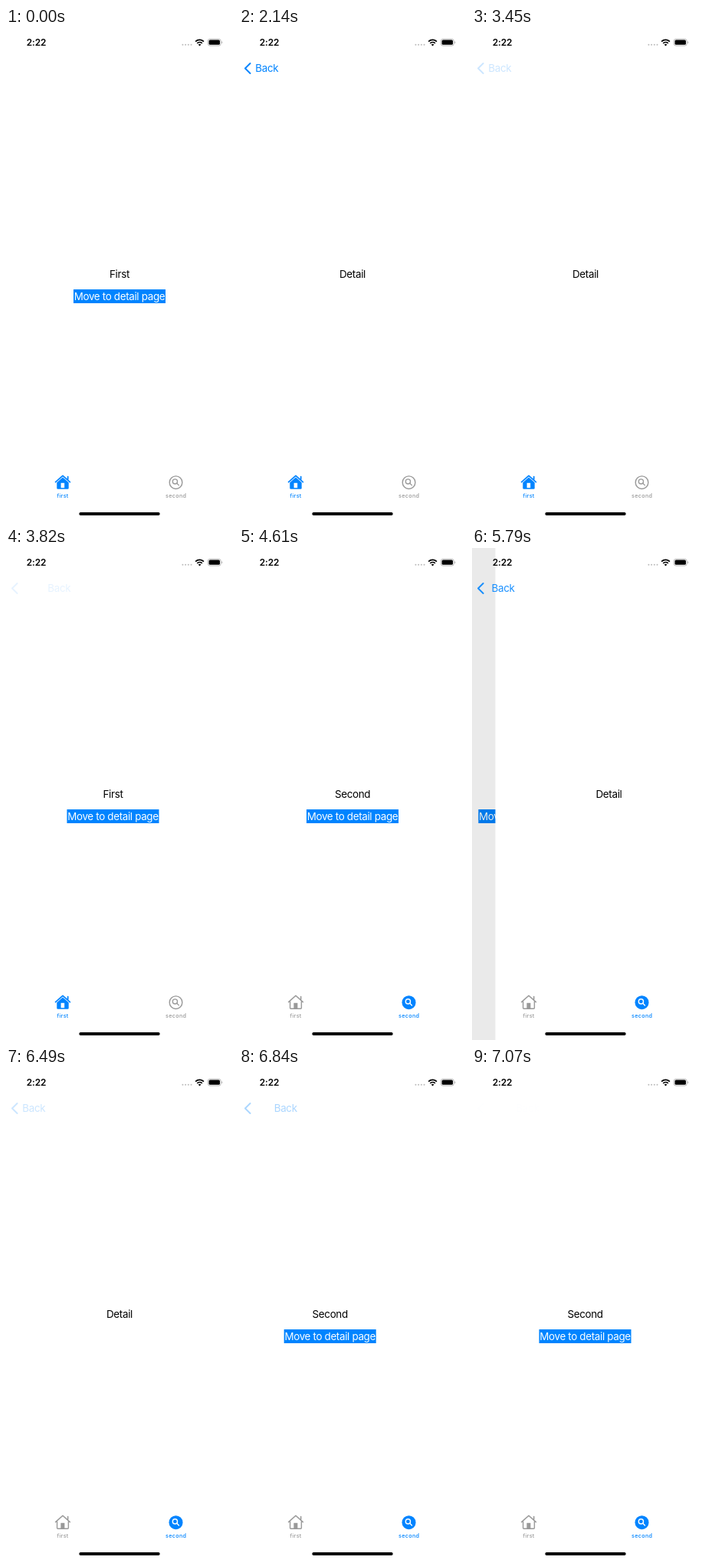
An HTML page for the animation above (7170 ms loop, 296x640 px).

```html
<!DOCTYPE html>
<html lang="en">
<head>
<meta charset="utf-8">
<title>Tab navigation</title>
<style>
  html, body { margin: 0; width: 100%; height: 100%; overflow: hidden; background: #fff; }

  /* --cover: how far the detail page covers the list page, 0 to 1 */
  svg {
    --cover: 0; --press: 1; --dim: 0; --slide: 41px; --second: 0;
    --blue: #0084ff; --gray: #999;
    display: block;
    font: 13.42px Inter, "Liberation Sans", sans-serif;
    letter-spacing: -.34px;
    animation: tour 7170ms step-end infinite;
  }
  @keyframes tour {
    0%      { --cover: 0; --press: 1; --dim: 0; --slide: 41px; --second: 0; }
    29.847% { --cover: 1; }
    48.117% { --press: .2; --slide: 36.5px; }
    51.883% { --cover: .33; --press: 1; }
    53.278% { --cover: .096; }
    54.951% { --cover: .022; }
    56.485% { --cover: .0056; }
    62.064% { --cover: 0; }
    64.296% { --second: 1; --slide: 41px; }
    77.545% { --cover: .55; --dim: .09; }
    79.219% { --cover: .897; }
    80.893% { --cover: .976; }
    82.427% { --cover: .994; }
    90.516% { --cover: 1; --press: .2; --dim: 0; --slide: 36.5px; }
    94.003% { --cover: .33; --press: 1; }
    95.537% { --cover: .09; }
    97.071% { --cover: .022; }
    98.605% { --cover: .0056; }
  }

  .list   { transform: translateX(calc(var(--cover) * -88.8px)); }
  .detail { transform: translateX(calc((1 - var(--cover)) * 296px)); }
  .shade  { opacity: calc(var(--cover) * var(--dim)); }
  .back   { opacity: calc(var(--cover) * var(--press)); fill: var(--blue); }
  .label  { transform: translateX(calc((1 - var(--cover)) * var(--slide))); }
  .on1    { opacity: calc(1 - var(--second)); }
  .on2    { opacity: var(--second); }

  .mid  { text-anchor: middle; }
  .time { font-size: 11.9px; font-weight: 600; letter-spacing: -.1px; }
  .tabs { font-size: 7.2px; font-weight: 500; letter-spacing: .3px; text-anchor: middle; }
  .line { fill: none; stroke-linecap: round; stroke-linejoin: round; }
  .blue { fill: var(--blue); }
  .gray { fill: var(--gray); }
  .blue .line { stroke: var(--blue); }
  .gray .line { stroke: var(--gray); }
</style>
</head>
<body>
<svg width="296" height="640" viewBox="0 0 296 640">
  <defs>
    <path id="roof" d="M64.6 590.6 74 582.3 83.4 590.6M80.7 587.6V583.6"/>
    <g id="lens">
      <circle cx="220.4" cy="589.9" r="3.1"/>
      <path d="M222.8 592.3 225.4 594.9"/>
    </g>
  </defs>

  <rect width="296" height="640" fill="#fff"/>

  <g class="list mid">
    <text class="on1" x="148" y="325.2">First</text>
    <text class="on2" x="148" y="325.2">Second</text>
    <rect class="blue" x="88" y="340" width="120" height="18"/>
    <text x="148" y="354.2" fill="#fff">Move to detail page</text>
  </g>
  <rect class="shade" width="296" height="640"/>

  <g class="detail mid">
    <rect width="296" height="640" fill="#fff"/>
    <text x="148" y="325.2">Detail</text>
  </g>

  <g class="back">
    <path class="line" d="M14.6 46 8 52.5 14.6 59" stroke="var(--blue)" stroke-width="1.9"/>
    <text class="label" x="21.3" y="57.2">Back</text>
  </g>

  <g class="status">
    <text class="time mid" x="39.5" y="23.2">2:22</text>
    <path class="line" d="M230.4 21.8h11.2" stroke="#bbb" stroke-width="2" stroke-dasharray="0 3.7"/>
    <g fill="none" stroke="#000" stroke-width="1.7">
      <path d="M247.1 17.6a7.8 7.8 0 0 1 10.8 0"/>
      <path d="M249.2 19.9a4.8 4.8 0 0 1 6.6 0"/>
    </g>
    <path d="M252.5 23.4 250.7 21.6a2.6 2.6 0 0 1 3.6 0z"/>
    <rect x="263.2" y="14.3" width="17" height="8.8" rx="2.7" fill="none" stroke="#aaa" stroke-width=".8"/>
    <rect x="264.5" y="15.6" width="14.4" height="6.2" rx="1.5"/>
    <path d="M281.3 17.2a1.6 1.6 0 0 1 0 3z" fill="#aaa"/>
  </g>

  <g class="tabs">
    <g class="blue on1">
      <use href="#roof" class="line" stroke-width="1.7"/>
      <path d="M66.3 591.2 74 584.6 81.7 591.2V598.6a1.2 1.2 0 0 1-1.2 1.2H67.5a1.2 1.2 0 0 1-1.2-1.2z"/>
      <rect x="71.6" y="591.8" width="4.6" height="6.4" fill="#fff"/>
      <text x="74" y="611.2">first</text>
    </g>
    <g class="gray on2">
      <use href="#roof" class="line" stroke-width="1.5"/>
      <path class="line" d="M66.6 590V598.2a1 1 0 0 0 1 1H80.4a1 1 0 0 0 1-1V590" stroke-width="1.4"/>
      <rect x="71.4" y="591.8" width="5" height="7.2"/>
      <text x="74" y="611.2">first</text>
    </g>
    <g class="gray on1">
      <circle class="line" cx="221.5" cy="591.2" r="8.3" stroke-width="1.4"/>
      <use href="#lens" class="line" stroke-width="1.3"/>
      <text x="221.7" y="611.2">second</text>
    </g>
    <g class="blue on2">
      <circle cx="221.5" cy="591.2" r="9"/>
      <g fill="none" stroke="#fff" stroke-width="1.4" stroke-linecap="round"><use href="#lens"/></g>
      <text x="221.7" y="611.2">second</text>
    </g>
  </g>

  <rect x="95.3" y="630" width="105.4" height="4" rx="2"/>
</svg>
</body>
</html>
```
